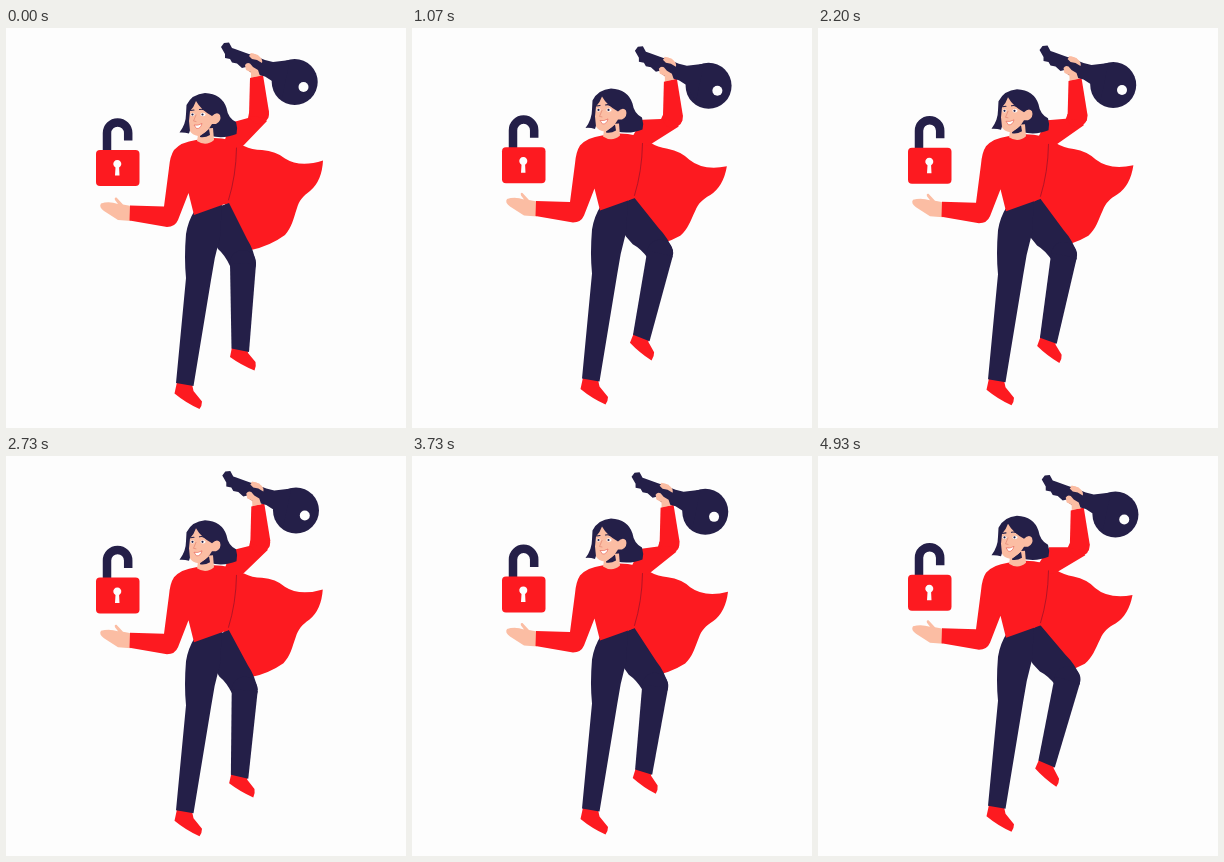
An HTML page without scripts for the animation above (4.99 s loop, 400x400 px).

```html
<!DOCTYPE html>
<html lang="en">
<head>
<meta charset="utf-8">
<title>Unlocked</title>
<style>
@property --p { syntax: "<number>"; inherits: true; initial-value: 0; }

html, body { margin: 0; width: 100%; height: 100%; overflow: hidden; background: #fdfdfd; }
svg {
  display: block; width: 100%; height: 100%;
  --red: #fd1a20; --ink: #241f48; --skin: #fbbda3;
  animation: sway 4990ms infinite;
}
.red { fill: var(--red); }
.ink { fill: var(--ink); }
.skin { fill: var(--skin); }
.light { fill: #fdfdfd; }
.line { fill: none; stroke-linecap: round; }

/* --p runs from 0 (leg down) to 1 (knee up) in a 3 s sine; the loop cuts mid-swing */
@keyframes sway {
  0%, 1.2% { --p: 0; animation-timing-function: cubic-bezier(.37, 0, .63, 1); }
  31.26% { --p: 1; animation-timing-function: cubic-bezier(.37, 0, .63, 1); }
  61.32% { --p: 0; animation-timing-function: cubic-bezier(.37, 0, .63, 1); }
  91.38% { --p: 1; animation-timing-function: cubic-bezier(.33, 0, .67, .33); }
  100% { --p: .81; }
}

.lock { transform: translateY(calc(var(--p) * -3.7px)); }
.body { transform: translateY(calc(var(--p) * -6px)); }
.joint { transform: rotate(calc(var(--p) * var(--turn))); }
.cape { --turn: 9deg; transform-origin: 229px 120px; }
.thigh { --turn: -16deg; transform-origin: 216px 180px; }
.shin { --turn: 30deg; transform-origin: 237px 235px; }
.arm { --turn: 18deg; transform-origin: 222px 122px; }
.forearm { --turn: -18deg; transform-origin: 253px 85px; }
</style>
</head>
<body>
<svg viewBox="0 0 400 400">
  <g class="lock">
    <path class="line" d="M101 124V105a10.6 10.6 0 0 1 21.2 0V112.5" stroke="var(--ink)" stroke-width="8.5" style="stroke-linecap:butt"/>
    <rect class="red" x="90" y="122" width="43.5" height="36" rx="4"/>
    <path class="light" d="M109.5 139.5a4 4 0 1 1 3.6 0L113.5 147.5H109Z"/>
  </g>

  <g class="body">
    <path class="red joint cape" d="M222 116L238 118Q246 122 256 122Q270 123 279 130.500Q294 140 317 132.500Q316 153 304 163C297 168 293 173 291 180C287 192 286 199 279 207Q264 218 245 222L236 205L215 170Z"/>

    <g class="joint arm">
      <path class="red" d="M243 85L242 90L224 95L215 125L236 119L261 93Z"/>
      <circle class="red" cx="253" cy="86" r="10"/>
      <g class="joint forearm">
        <path class="skin" d="M245 50L245 45L240 41L239 36L244 33L242 28L245 25L252 27L256 32L257 40L254 49Z"/>
        <path class="red" d="M244 50L257 47L263 84L262 90L243 88Z"/>
        <circle class="ink" cx="288.700" cy="54" r="23"/>
        <path class="ink" d="M215 19L218 15L223 14.500L226 20L229 21L240 25L250 28.500L259 32L267 34L284 32L276 70L266 53L259 48.500L250 46L243 43L240 39L236 40L231 35.500L226 34.500L224 31L219 30L219 26Z"/>
        <circle class="light" cx="297.500" cy="59" r="5"/>
        <path class="skin" d="M239 37Q241 34 244 35.500L247 39L252 42L254 48L246 49L245 44L240 42ZM243 28Q245 24.500 249 26L254 29Q257 32 256 35L251 32L246 31Z"/>
      </g>
    </g>

    <g class="joint thigh">
      <path class="ink" d="M198 184L223 175L241 211Q248 222 250 236L224 238Q219 227 212 221L207 212Z"/>
      <circle class="ink" cx="237" cy="235" r="13"/>
      <g class="joint shin">
        <path class="red" d="M226 319L241.5 321L242 325L249.5 334Q250.5 338 248.5 342.5Q235 337 224 329Z"/>
        <path class="ink" d="M224 235L250 236L243 324L225.500 320.500Z"/>
      </g>
    </g>

    <path class="red" d="M171 354L186 356L187.5 363L196 373.5Q196 378 193.5 381Q180 375 168.5 365.5Z"/>
    <path class="ink" d="M189 182L216 176L214 209Q208 230 205 252L187.5 358L170 355L180 250Q178 230 180 206Q182 193 189 182Z"/>

    <path class="skin" d="M125 178L117 176.5L110.5 169.5Q108 169 109 172L112 176Q103 173 95 175.5Q92.5 179 98 183L112 192L125 193Z"/>
    <path class="red" d="M190 112Q175 114 168 122Q164 128 163 140L158 178.5L124 177.5L123.5 192.5L161 199Q169 199 172 192L182.5 165L188 187L223 174.5L230 138L231 119L224 112Q208 108 190 112Z"/>
    <path class="line" d="M230.5 120Q230 148 222.5 172" stroke="#a01428" stroke-width=".8"/>

    <path class="ink" d="M180.500 77Q186 66 199 65Q216 66 220.500 80Q222 90 230 94Q232 100 230.500 106Q219 111 204 108L188 91Q185 98 183 105.500Q178 104 173.500 104.500Q180 96 180 86Z"/>
    <path class="skin" d="M193 101L207 100L208 112Q200 119 191 113Z"/>
    <path class="ink" d="M194 108L203 101L204 107Q199 110 194 109Z"/>
    <path class="skin" d="M184 83Q188 79 190 73Q195 82 206 88Q211 83 214 87Q216 93 210 96L206 96Q201 105 192 108Q186 107 184 103L183 93Z"/>
    <path class="line" d="M184.5 82.5L188 82M193.5 81.5Q197 80.500 200.500 83" stroke="var(--ink)" stroke-width="1.1"/>
    <ellipse cx="186.500" cy="86.500" rx="2" ry="1.600" fill="#fff"/>
    <ellipse cx="197" cy="86.500" rx="2.600" ry="1.700" fill="#fff"/>
    <circle class="ink" cx="186.500" cy="86.5" r="1.1"/>
    <circle class="ink" cx="196.500" cy="86.5" r="1.1"/>
    <path class="line" d="M190 87L187.5 93L190 93.5" stroke="#e58c78" stroke-width=".8"/>
    <path d="M188 97Q192 98 196 95.5Q194.5 101 190.5 100.5Z" fill="#fff" stroke="#e8584a" stroke-width=".6"/>
  </g>
</svg>
</body>
</html>
```
